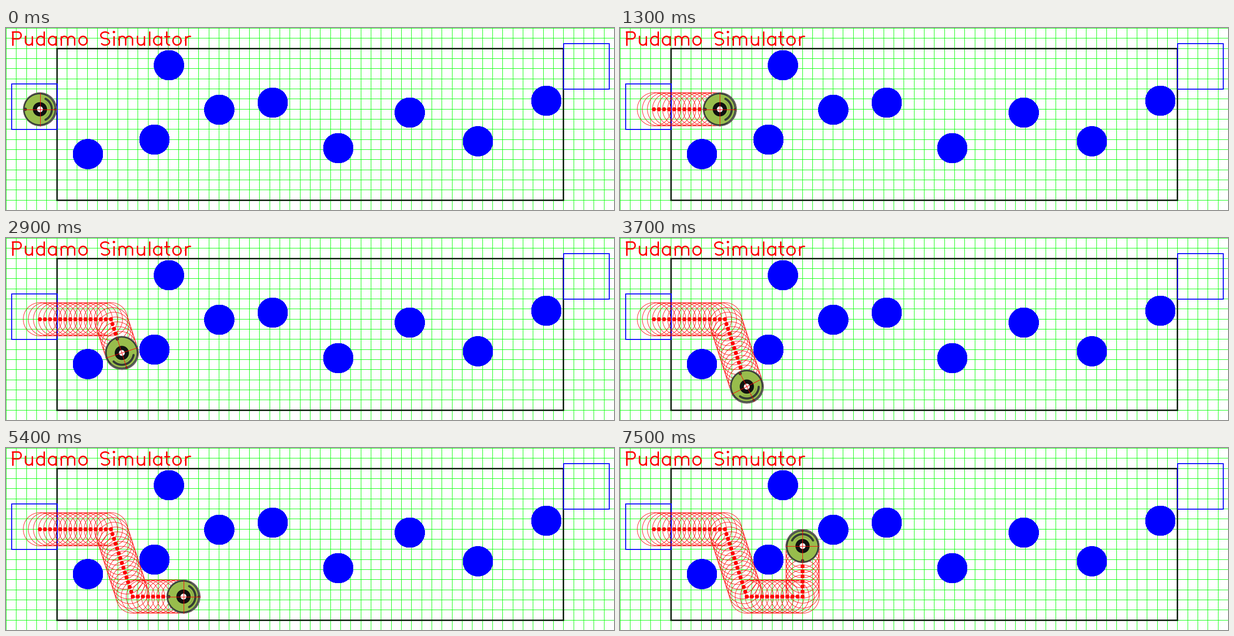
These frames come from a looping animation (1280 by 384 pixels, 7600 ms). A matplotlib script:

```python
import numpy as np
import matplotlib.pyplot as plt
from matplotlib.animation import FuncAnimation
from matplotlib.patches import Circle, Rectangle
from matplotlib.transforms import Affine2D

W, H, DPI = 1280, 384, 100
FRAMES, INTERVAL = 76, 100
UNIT = 16 / 15              # pixels per centimetre of floor
CELL, STEP, TURN = 20, 10, 9
RED, BLUE, GREEN = "#ff0000", "#0000ff", "#00ff00"

fig = plt.figure(figsize=(W / DPI, H / DPI), dpi=DPI, facecolor="white")
ax = fig.add_axes([0, 0, 1, 1])
ax.set_xlim(-0.5, W - 0.5)
ax.set_ylim(H - 0.5, -0.5)
ax.axis("off")


def px(n):
    return n * 72 / DPI


def line(xs, ys, color, width, z, **kw):
    return ax.plot(xs, ys, color=color, lw=px(width), zorder=z, **kw)[0]


def fill(x0, y0, x1, y1, color, z):
    """Fill whole pixels, both ends included."""
    ax.add_patch(Rectangle((x0 - 0.5, y0 - 0.5), x1 - x0 + 1, y1 - y0 + 1,
                           fc=color, lw=0, antialiased=False, zorder=z))


def box(left, top, width, height, color, before, after, z):
    """Outline in floor units, reaching some pixels before and after the edge."""
    x0, y0, x1, y1 = (round(v * UNIT) for v in
                      (left, top, left + width, top + height))
    for x in (x0, x1):
        fill(x - before, y0 - before, x + after, y1 + after, color, z)
    for y in (y0, y1):
        fill(x0 - before, y - before, x1 + after, y + after, color, z)


# Floor grid, room walls, start and goal zones
for k in range(60):
    p = round(k * CELL * UNIT)
    fill(p, 0, p, H - 1, GREEN, 1)
    if p < H:
        fill(0, p, W - 1, p, GREEN, 1)
box(100, 40, 1000, 300, "black", 1, 1, 2)
box(100, 40, 1000, 300, "#2e5a2e", 0, 0, 2.1)
box(10, 110, 90, 90, BLUE, 0, 1, 3)
box(1100, 30, 90, 90, BLUE, 0, 1, 3)

OBSTACLES = [(172, 265.5), (342.5, 78), (312, 235), (448.5, 172), (561, 157),
             (699, 253), (849.5, 178), (993, 238.5), (1137, 153)]
for c in OBSTACLES:
    ax.add_patch(Circle(c, 31.4, fc=BLUE, lw=0, antialiased=False, zorder=3))


# Single-stroke lettering built from stems and arcs, y up from the baseline
def arc(cx, cy, rx, ry, a0, a1):
    t = np.radians(np.linspace(a0, a1, 25))
    return list(zip(cx + rx * np.cos(t), cy + ry * np.sin(t)))


def stem(x, top):
    return [(x, top), (x, 0)]


def hump(x):
    return arc(x + 5.5, 8.5, 5.5, 5.5, 180, 0) + [(x + 11, 0)]


def bowl(gap):
    return arc(9.5, 7, 6.5, 7, gap, 360 - gap)


GLYPHS = {
    " ": (16, []),
    "P": (21, [stem(4, 21), [(4, 21)] + arc(13, 15.5, 5, 5.5, 90, -90) + [(4, 10)]]),
    "S": (20, [arc(10, 15.75, 7, 5.25, 35, 270) + arc(10, 5.25, 7, 5.25, 90, -145)]),
    "a": (19, [stem(15, 14), bowl(32)]),
    "d": (19, [stem(15, 21), bowl(32)]),
    "i": (8, [stem(4, 14), arc(4, 21, 0.8, 0.8, 0, 360)]),
    "l": (8, [stem(4, 21)]),
    "m": (30, [stem(4, 14), hump(4), hump(15)]),
    "o": (19, [bowl(0)]),
    "r": (13, [stem(4, 14), arc(11, 7, 7, 7, 180, 80)]),
    "t": (12, [[(5, 21)] + arc(9.5, 4.5, 4.5, 4.5, 180, 270), [(2, 14), (9, 14)]]),
    "u": (19, [stem(15, 14), [(4, 14)] + arc(9.5, 5.5, 5.5, 5.5, 180, 360)]),
}


def write(text, x, y, size):
    for ch in text:
        advance, strokes = GLYPHS[ch]
        for s in strokes:
            sx, sy = np.array(s).T
            line(x + size * sx, y - size * sy, RED, 3, 4,
                 solid_capstyle="round", solid_joinstyle="round")
        x += size * advance


write("Pudamo Simulator", 7.8, 35.5, 1.31)


# Route: turn on the spot to each heading, then drive a number of steps
def plan(x, y, legs):
    head, trail = 0, [(x, y)]
    poses = [(x, y, head, 1)]
    for steps, goal in legs:
        while head != goal:
            head += TURN if goal > head else -TURN
            poses.append((x, y, head, len(trail)))
        for _ in range(steps):
            x += STEP * UNIT * np.cos(np.radians(head))
            y += STEP * UNIT * np.sin(np.radians(head))
            trail.append((x, y))
            poses.append((x, y, head, len(trail)))
    return poses, trail


poses, trail = plan(71, 171, [(14, 0), (14, 72), (11, 0), (10, -90)])
marks = []
for c in trail:
    ring = Circle(c, 35.2, fill=False, ec=RED, lw=px(0.9), zorder=5)
    dot = Circle(c, 4.3, fc=RED, lw=0, zorder=5)
    marks.append((ax.add_patch(ring), ax.add_patch(dot)))

# Robot, drawn about the origin and facing right
robot = []


def disc(x, r, color):
    robot.append(ax.add_patch(Circle((x, 0), r, fc=color, lw=0, zorder=6)))


def band(r, spread, color, width):
    t = np.radians(np.linspace(-spread, spread, 40))
    robot.append(line(r * np.cos(t), r * np.sin(t), color, width, 6,
                      solid_capstyle="round"))


disc(0, 35.8, "#6a706c")
disc(-0.4, 34.2, "#343a36")
disc(-0.8, 31.6, "#98bd4c")
band(32.5, 60, "#596259", 1.6)
band(25, 62, "#343c34", 4.6)
band(19.5, 50, "#7fa03c", 1.4)
disc(-31, 3.6, "#3c3a30")
disc(32, 2.6, "#3c3a30")
disc(0, 15, "#101210")
disc(0, 6.2, "#f4f4f4")
robot.append(line([-35, 35], [0, 0], RED, 1, 7))
robot.append(line([0, 0], [-35, 35], RED, 1, 7))


def update(i):
    x, y, head, count = poses[i]
    place = Affine2D().rotate_deg(head).translate(x, y) + ax.transData
    for part in robot:
        part.set_transform(place)
    for k, pair in enumerate(marks):
        for m in pair:
            m.set_visible(k < count)
    return robot


anim = FuncAnimation(fig, update, frames=FRAMES, interval=INTERVAL,
                     init_func=lambda: update(0), repeat=True, repeat_delay=0,
                     blit=False)
plt.show()
```
